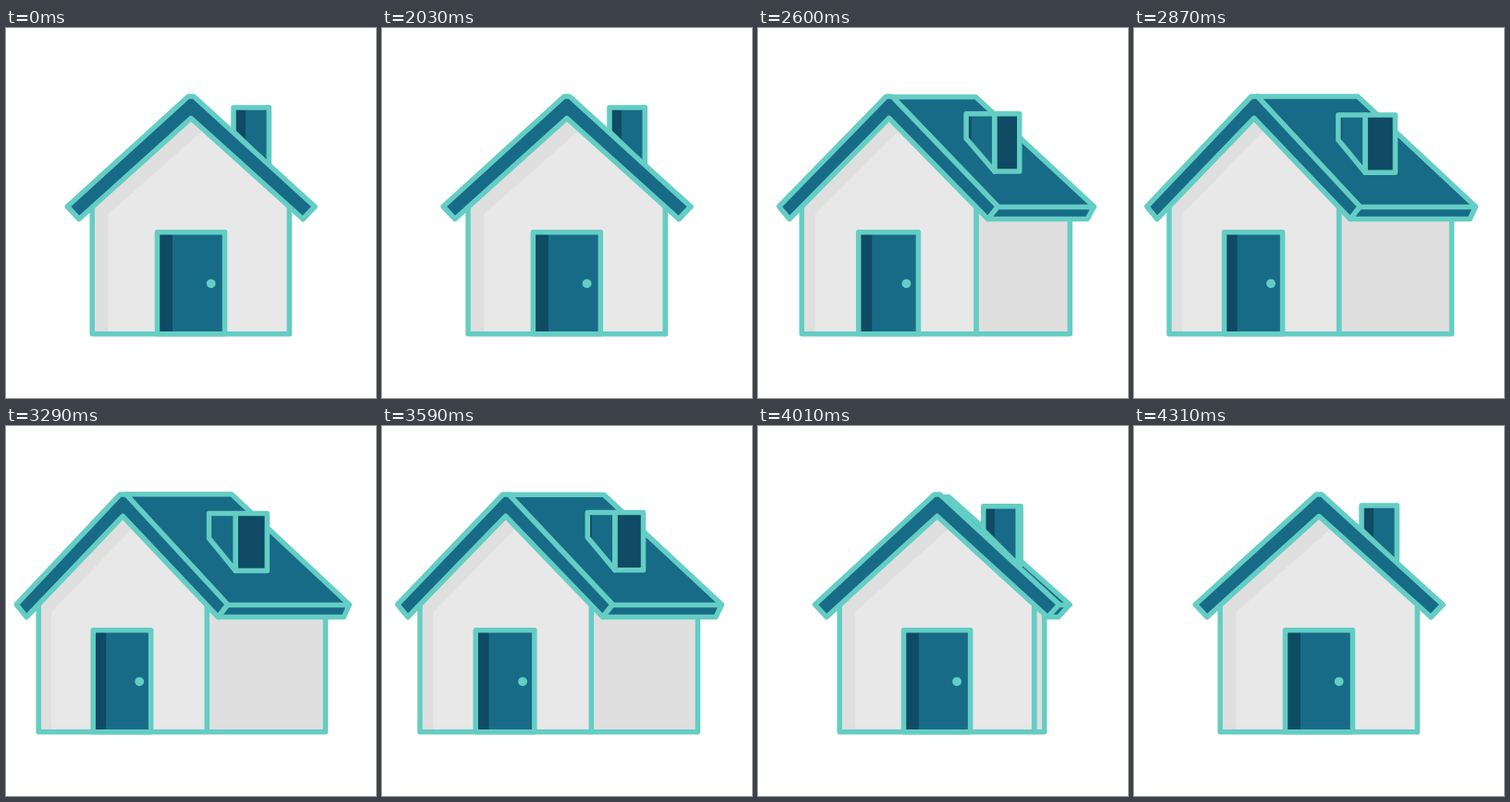
Write an HTML page that moves like this. It is 400 px wide and 400 px high and loops after 4.34 s.

```html
<!DOCTYPE html>
<html lang="en">
<head>
<meta charset="utf-8">
<title>Turning house</title>
<style>
  html, body { margin: 0; width: 100%; height: 100%; overflow: hidden; background: #fff; }
  svg { display: block; width: 100vw; height: 100vh; }
  .line { stroke: #64cdc4; stroke-width: 5.5; stroke-linejoin: round; stroke-linecap: round; }
  .blue { fill: #186b87; }
  .dark { fill: #0f4b64; }
  .wall { fill: #e8e8e8; }
  .shade { fill: #dfdfdf; }
  .none { fill: none; }
  .knob { fill: #64cdc4; }
</style>
</head>
<body>
<svg id="stage" viewBox="0 0 400 400"></svg>
<script>
const LOOP = 4340, STEP = 30, FIRST = 2030;
const OPEN = 2000, TURN = 3210;
const NS = 'http://www.w3.org/2000/svg';
const stage = document.getElementById('stage');

// Each value runs from its front view to its turned view.
const X = {
  wallL: [93.2, 35], wallR: [306.3, 217], sideR: [306.3, 345.5],
  shadeL: [110.5, 49], shadeTop: [216, 139],
  apex: [200, 126], apexL: [197, 123], apexR: [203, 129.5],
  eaveL: [66.3, 11], footL: [79, 22], eaveR: [333.7, 239.3], footR: [321, 229],
  ridge: [203, 244], backEave: [333.7, 371.2], backFoot: [321, 365.5],
  doorL: [163.5, 94], doorR: [236.5, 156.5], doorShade: [180, 108], knob: [221.7, 144],
  chimL: [246, 219.5], chimM: [284.3, 248], chimR: [284.3, 282.3], chimShade: [259, 223]
};
const Y = {
  ridge: [77, 73.8], chimTop: [86, 94.5], chimLow: [112, 121.5], chimFoot: [149.5, 156.5]
};

function add(tag, cls) {
  const el = document.createElementNS(NS, tag);
  el.setAttribute('class', cls);
  stage.appendChild(el);
  return el;
}

const BASE = 330.8, EAVE = 193, FOOT = 206.5, TOP = 74, DOOR = 220.8;

// Back to front: class, then the corners at the current pose.
const shapes = [
  ['shade line', (x, y) => [x.wallR, 190, x.sideR, 190, x.sideR, BASE, x.wallR, BASE]],
  ['blue line', (x, y) => [x.apexR, y.ridge, x.ridge, y.ridge, x.backEave, EAVE,
    x.backFoot, FOOT, x.footR, FOOT, x.eaveR, EAVE]],
  ['none line', (x, y) => [x.eaveR, EAVE + .5, x.backEave, EAVE + .5]],
  ['dark line', (x, y) => [x.chimM, y.chimTop, x.chimR, y.chimTop, x.chimR, y.chimFoot, x.chimM, y.chimFoot]],
  ['blue', chimney],
  ['dark', (x, y) => {
    const k = (x.chimShade - x.chimL) / (x.chimM - x.chimL);
    return [x.chimL, y.chimTop, x.chimShade, y.chimTop,
      x.chimShade, y.chimLow + k * (y.chimFoot - y.chimLow), x.chimL, y.chimLow];
  }],
  ['none line', chimney],
  ['wall', wall],
  ['shade', (x, y) => [x.wallL, BASE, x.wallL, 186, x.apex, 90, x.shadeTop, 108, x.shadeL, 201, x.shadeL, BASE]],
  ['none line', wall],
  ['blue', door],
  ['dark', (x, y) => [x.doorL, DOOR, x.doorShade, DOOR, x.doorShade, BASE, x.doorL, BASE]],
  ['none line', door],
  ['blue line', (x, y) => [x.apexL, TOP, x.apexR, TOP, x.eaveR, EAVE, x.footR, FOOT,
    x.apex, 97.5, x.footL, FOOT, x.eaveL, EAVE]]
].map(([cls, corners]) => ({ el: add('polygon', cls), corners }));

const knob = add('circle', 'knob');
knob.setAttribute('cy', 276.3);
knob.setAttribute('r', 4.9);

function chimney(x, y) {
  return [x.chimL, y.chimTop, x.chimM, y.chimTop, x.chimM, y.chimFoot, x.chimL, y.chimLow];
}
function wall(x) {
  return [x.wallL, BASE, x.wallL, 186, x.apex, 90, x.wallR, 186, x.wallR, BASE];
}
function door(x) {
  return [x.doorL, DOOR, x.doorR, DOOR, x.doorR, BASE, x.doorL, BASE];
}

// Cubic ease with level ends; a and b are the handles' time positions.
function ease(t, a, b) {
  let lo = 0, hi = 1, s = t;
  for (let i = 0; i < 24; i++) {
    s = (lo + hi) / 2;
    const r = 1 - s;
    if (3 * s * r * r * a + 3 * s * s * r * b + s * s * s < t) lo = s; else hi = s;
  }
  return s * s * (3 - 2 * s);
}

function pose(t) {
  if (t < FIRST) return 0;
  t = FIRST + Math.floor((t - FIRST) / STEP) * STEP;
  return t < TURN
    ? ease((t - OPEN) / (TURN - OPEN), .32, .2)
    : 1 - ease((t - TURN) / (LOOP - TURN), .79, .26);
}

function mix(table, p) {
  const out = {};
  for (const k in table) out[k] = table[k][0] + (table[k][1] - table[k][0]) * p;
  return out;
}

function draw(t) {
  const p = pose(t), x = mix(X, p), y = mix(Y, p);
  for (const s of shapes) s.el.setAttribute('points', s.corners(x, y).map(v => v.toFixed(2)).join(' '));
  knob.setAttribute('cx', x.knob);
}

const start = performance.now();
function tick() {
  draw((performance.now() - start) % LOOP);
  requestAnimationFrame(tick);
}
tick();
</script>
</body>
</html>
```
